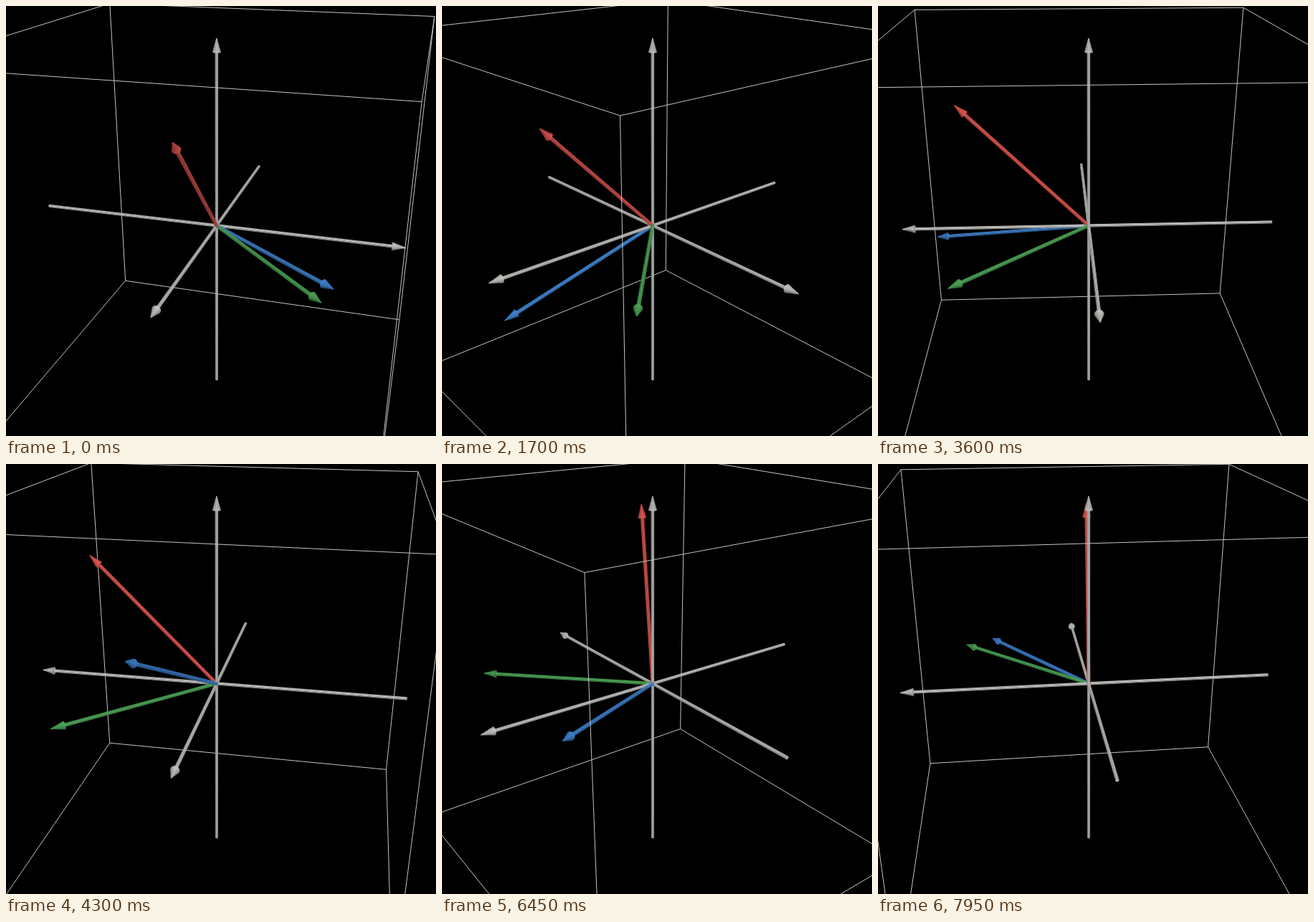
Animation, 600 px wide and 600 px high, one loop 8 s. Source, as an HTML page:

```html
<!DOCTYPE html>
<html>
<head>
<meta charset="utf-8">
<style>
  html, body { margin: 0; width: 100%; height: 100%; overflow: hidden; background: #000; }
  svg { display: block; width: 100vw; height: 100vh; }
</style>
</head>
<body>
<svg id="stage" viewBox="0 0 600 600"></svg>
<script>
const stage = document.getElementById('stage');
const LOOP = 8000, STEP = 50;
const RAD = Math.PI / 180;

// Camera: distance, scale, screen position of the world origin, elevation
const DIST = 4, SCALE = 258.6, CX = 293.9, CY = 306.5;
const SE = 0.4055, CE = Math.sqrt(1 - SE * SE);
const LIGHT = [0.1, 0.45, 0.887];

// Turn of the scene and spin of the blue arrow, in degrees
const TIMES = [0, 1700, 2900, 4300, 5500, 6450, 7950];
const TURN = [16.2, 49.1, 73.37, 101.05, 123.93, 143.65, 173.15];
const SPIN = [-5.7, -303.1, -518.7, -765.1, -977.6, -1154.9, -1427.8];
const TILT_TIME = 4750, TILT = [45, 84.3];

const GRAY = [200, 200, 197], RED = [232, 90, 84], GREEN = [80, 169, 90], BLUE = [66, 136, 214];
const AXIS = 0.995, ARROW = 0.948, HEAD = 0.067, HEAD_R = 0.0203;

const dot = (a, b) => a[0] * b[0] + a[1] * b[1] + a[2] * b[2];
const cross = (a, b) => [a[1] * b[2] - a[2] * b[1], a[2] * b[0] - a[0] * b[2], a[0] * b[1] - a[1] * b[0]];
const mul = (a, k) => a.map(x => x * k);
const add = (...vs) => [0, 1, 2].map(i => vs.reduce((s, v) => s + v[i], 0));
const unit = a => mul(a, 1 / Math.hypot(...a));

function track(values, t) {
  let i = 0;
  while (i < TIMES.length - 2 && t >= TIMES[i + 1]) i++;
  const k = (t - TIMES[i]) / (TIMES[i + 1] - TIMES[i]);
  return values[i] + (values[i + 1] - values[i]) * k;
}

function toView([x, y, z], turn) {
  const c = Math.cos(turn), s = Math.sin(turn);
  const near = x * s + y * c;
  return [x * c - y * s, z * CE - near * SE, near * CE + z * SE];
}

function project([x, y, z]) {
  const k = SCALE / (1 - z / DIST);
  return (CX + x * k).toFixed(2) + ',' + (CY - y * k).toFixed(2);
}

const facing = (p, n) => dot(n, [-p[0], -p[1], DIST - p[2]]) > 0;

function face(points, normal, color) {
  const b = 0.62 + 0.38 * Math.max(0, dot(normal, LIGHT));
  const c = `rgb(${color.map(v => Math.round(v * b))})`;
  return `<polygon points="${points.map(project).join(' ')}" fill="${c}" stroke="${c}" stroke-width=".3"/>`;
}

function ring(dir, at, r, sides) {
  const u = unit(cross(dir, Math.abs(dir[1]) < 0.9 ? [0, 1, 0] : [1, 0, 0]));
  const v = cross(dir, u);
  return Array.from({ length: sides }, (_, i) => {
    const a = i / sides * 2 * Math.PI;
    return add(mul(dir, at), mul(u, r * Math.cos(a)), mul(v, r * Math.sin(a)));
  });
}

// Side wall of a cylinder or cone along dir
function wall(dir, from, to, r0, r1, color, sides) {
  const a = ring(dir, from, r0, sides), b = ring(dir, to, r1, sides);
  const slope = mul(dir, (r0 - r1) / (to - from));
  let out = '';
  for (let i = 0; i < sides; i++) {
    const j = (i + 1) % sides;
    const mid = mul(add(a[i], a[j]), 0.5);
    const n = unit(add(unit(add(mid, mul(dir, -from))), slope));
    if (facing(mid, n)) out += face([a[i], a[j], b[j], b[i]], n, color);
  }
  return out;
}

function disc(dir, at, r, normal, color) {
  return facing(mul(dir, at), normal) ? face(ring(dir, at, r, 16), normal, color) : '';
}

function rod(dir, length, r, color) {
  return wall(dir, 0, length, r, r, color, 10) + disc(dir, length, r, dir, color);
}

function arrow(dir, length, r, color) {
  const base = length - HEAD;
  const shaft = wall(dir, 0, base, r, r, color, 10);
  const back = disc(dir, base, HEAD_R, mul(dir, -1), color);
  const cone = wall(dir, base, length, HEAD_R, 0.0004, color, 16);
  return back ? cone + back + shaft : shaft + cone;
}

// The twelve cube edges, split into those behind and before the origin
function cube(turn) {
  const out = { back: '', front: '' };
  for (let axis = 0; axis < 3; axis++) {
    for (const p of [-1, 1]) for (const q of [-1, 1]) {
      const [a, b] = [-1, 1].map(s => {
        const v = [0, 0, 0];
        v[axis] = s;
        v[(axis + 1) % 3] = p;
        v[(axis + 2) % 3] = q;
        return toView(v, turn);
      });
      out[a[2] + b[2] > 0 ? 'front' : 'back'] += `M${project(a)}L${project(b)}`;
    }
  }
  return out;
}

function rotate(v, axis, angle) {
  const along = mul(axis, dot(axis, v));
  return add(along, mul(add(v, mul(along, -1)), Math.cos(angle)), mul(cross(axis, v), Math.sin(angle)));
}

function draw(t) {
  const turn = track(TURN, t) * RAD;
  const tilt = TILT[t < TILT_TIME ? 0 : 1] * RAD;
  const green = [Math.SQRT1_2, Math.SQRT1_2, 0];
  const red = [0, Math.cos(tilt), Math.sin(tilt)];
  const blue = rotate(green, red, track(SPIN, t) * RAD);

  const parts = [];
  const put = (v, make, length, r, color) => {
    const dir = toView(v, turn);
    parts.push({ depth: dir[2], svg: make(dir, length, r, color) });
  };
  for (const v of [[1, 0, 0], [0, 1, 0], [0, 0, 1]]) {
    put(v, arrow, AXIS, 0.0077, GRAY);
    put(mul(v, -1), rod, 1, 0.0077, GRAY);
  }
  put(red, arrow, ARROW, 0.0089, RED);
  put(green, arrow, ARROW, 0.0089, GREEN);
  put(blue, arrow, ARROW, 0.0089, BLUE);
  parts.sort((a, b) => a.depth - b.depth);

  const box = cube(turn);
  const lines = d => `<path d="${d}" fill="none" stroke="#c4c4c4" stroke-width="1"/>`;
  stage.innerHTML = '<rect width="600" height="600"/>' + lines(box.back) +
    parts.map(p => p.svg).join('') + lines(box.front);
}

const start = performance.now();
let shown = -1;
function tick() {
  const t = Math.floor((performance.now() - start) % LOOP / STEP) * STEP;
  if (t !== shown) draw(shown = t);
  requestAnimationFrame(tick);
}
tick();
</script>
</body>
</html>
```
